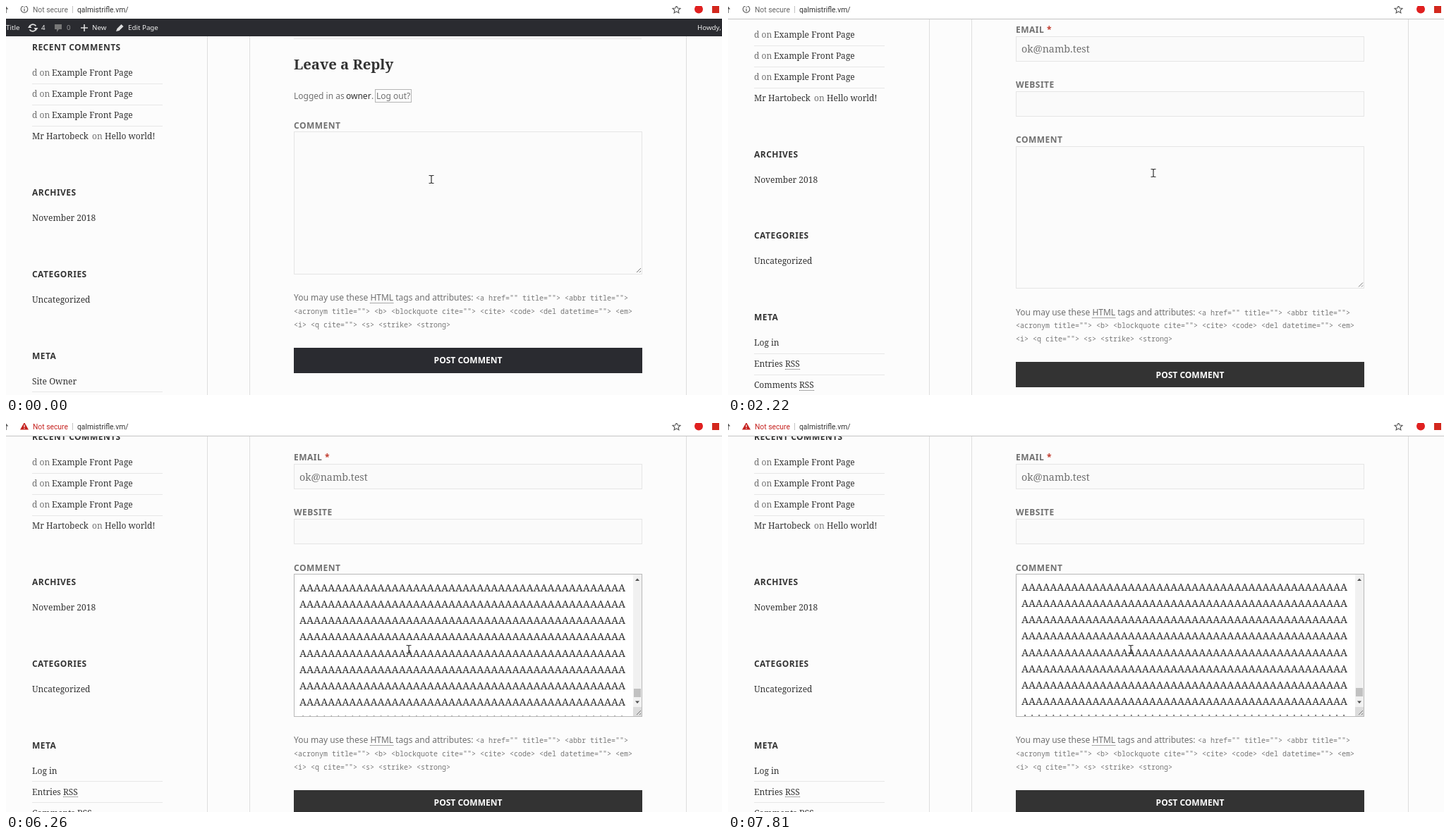
Recreate the animation shown at these times as an HTML page. Size 1015 by 552 pixels, loop 8000 ms.

```html
<!DOCTYPE html>
<html lang="en">
<head>
<meta charset="utf-8">
<title>Comment form</title>
<style>
  html, body { margin: 0; width: 100%; height: 100%; overflow: hidden; background: #fcfcfc; }
  svg { display: block; }
  text { font: 12px "Noto Sans", sans-serif; fill: #333; white-space: pre; }
  .serif { font-family: "Noto Serif", serif; }
  .soft { fill: #707070; }
  .body { font: 14.25px "Noto Serif", serif; }
  .head { font-weight: 700; letter-spacing: .04em; }
  .h1 { font: 700 29.25px "Noto Serif", serif; }
  .h2 { font: 700 20.25px "Noto Serif", serif; }
  .site { font-weight: 700; font-size: 20.25px; }
  .author { font-weight: 700; }
  .code { font: 10px "Noto Sans Mono", monospace; fill: #777; }
  .post { font-weight: 700; fill: #fff; text-anchor: middle; }
  .bar { font-size: 9.75px; fill: #eee; }
  .dim { opacity: .55; }
  .url { font: 10.3px Roboto, sans-serif; }
  rect, .rule { shape-rendering: crispEdges; }
  .rule { stroke: #e7e7e7; fill: none; }
  .chrome { stroke: #c4c4c4; }
  .edge { stroke: #dedede; fill: none; }
  .box { stroke: #e5e5e5; fill: #fafafa; }
  .dots { stroke: #555; stroke-dasharray: 1 1; shape-rendering: crispEdges; }
</style>
</head>
<body>
<svg id="stage" width="1015" height="552" viewBox="0 0 1015 552"></svg>
<script>
const LOOP = 8000, ROW = 23.25;

const text = (x, y, s, cls = '') =>
  `<text x="${x}" y="${y}" class="${cls}">${s.replace(/&/g, '&amp;').replace(/</g, '&lt;')}</text>`;
const line = (x1, x2, y, cls = 'rule') => `<path class="${cls}" d="M${x1} ${y}H${x2}"/>`;
const rect = (x, y, w, h, attrs) => `<rect x="${x}" y="${y}" width="${w}" height="${h}" ${attrs}/>`;
const group = (id, body) => `<g id="${id}">${body}</g>`;
const link = (y, s) => text(37, y, s, 'serif');
const label = (x, y, s, cls = '') => text(x, y, s, 'head ' + cls);
const sideRule = y => line(37, 222, y);

// Sidebar, laid out for an unscrolled page
function sidebar() {
  let s = text(37, 102.5, 'Example Title', 'site') +
    text(37, 126, 'Example Description', 'soft') +
    rect(37.5, 193.5, 185, 29, 'class="box"') + text(43.5, 212, 'Search …', 'soft') +
    label(37, 298, 'RECENT POSTS') + link(334, 'Hello world!') +
    label(37, 413, 'RECENT COMMENTS');
  for (let i = 0; i < 3; i++) {
    const y = 449 + i * 30;
    s += text(37, y, 'd on', 'serif soft') + text(65, y, 'Example Front Page', 'serif') + sideRule(y + 11.5);
  }
  s += link(539, 'Mr Hartobeck') + text(122, 539, 'on', 'serif soft') + text(140, 539, 'Hello world!', 'serif') +
    label(37, 619, 'ARCHIVES') + link(655, 'November 2018') +
    label(37, 734.5, 'CATEGORIES') + link(770.5, 'Uncategorized') +
    label(37, 850.5, 'META') + sideRule(897.5);
  const guest = link(886.5, 'Log in') + link(916.5, 'Entries RSS') + line(81, 102, 919.5, 'dots') +
    sideRule(927.5) + link(946.5, 'Comments RSS') + line(101, 122, 949.5, 'dots') +
    sideRule(957.5) + link(976.5, 'Site news');
  return s + group('guestMeta', guest) + group('userMeta', link(886.5, 'Site Owner'));
}

function comment(y) {
  return line(408, 901, y + .5) +
    `<g transform="translate(429 ${y + 48})"><circle r="21" fill="#c1c1c1"/>
     <ellipse cy="-3.5" rx="9.5" ry="10" fill="#fff"/>
     <path d="M-15 16Q-12 9-6 7H6Q12 9 15 16Q0 27-15 16Z" fill="#fff"/></g>` +
    text(474, y + 42, 'd', 'body author soft') +
    text(474, y + 65, 'November 13, 2018 at 10:42 pm', 'soft') +
    text(408, y + 107, 'dsd', 'body') +
    rect(408.5, y + 138.5, 58, 25, 'class="box"') + text(419, y + 155.5, 'REPLY', 'author soft');
}

function posts() {
  let s = rect(345.5, 81.5, 619, 221.5, 'class="edge"') + rect(345.5, 362.5, 619, 1480, 'class="edge"') +
    text(408, 173.5, 'Example Front Page', 'h1') +
    text(408, 233, 'Front Page created by QAlmistrifle', 'body') +
    text(408, 445, '3 thoughts on “Example Front Page”', 'h2');
  for (let i = 0; i < 3; i++) s += comment(478 + i * 193);
  return s;
}

// Guest fields, in the place where the page comes to rest
function fields() {
  const star = x => `<tspan x="${x}" fill="#c0392b">*</tspan>`;
  const field = (y, name, value, starX) =>
    `<text x="408" y="${y}" class="head soft">${name}${starX ? star(starX) : ''}</text>` +
    rect(408.5, y + 5.5, 493, 35, 'class="box"') + text(416, y + 28.5, value, 'body soft');
  return line(408, 901, -150.5) + text(408, -108, 'Leave a Reply', 'h2') +
    text(408, -67, 'Your email address will not be published. Required fields are marked *', 'soft') +
    field(-25, 'NAME', 'ok', 448) + field(53, 'EMAIL', 'ok@namb.test', 452) + field(131, 'WEBSITE', '');
}

function userIntro() {
  return line(408, 901, 46.5) + text(408, 90, 'Leave a Reply', 'h2') +
    text(408, 131.5, 'Logged in as', 'soft') + text(482, 131.5, 'owner') + text(518, 131.5, '.', 'soft') +
    rect(523.5, 118.5, 51, 18, 'fill="none" stroke="#b5b5b5" stroke-width="1.5"') +
    text(525, 131.5, 'Log out?', 'soft') +
    '<path class="edge" d="M345.5 43V552M964.5 43V552"/>';
}

function essay() {
  let s = text(416, 401, '></a>', 'body');
  for (let k = 1; k < 30; k++)
    s += text(416, 401 - k * ROW, 'A'.repeat(46) + (k === 1 ? "'" : ''), 'body');
  return s;
}

function commentBox() {
  const bar = rect(889, 215, 12, 188, 'id="rail"') + rect(889, 403, 12, 13, 'fill="#dcdcdc"') +
    rect(890, 378, 10, 12, 'id="thumb" fill="#c1c1c1"') +
    '<path d="M892 224l3-3.5 3 3.5z" fill="#505050"/><path id="down" d="M892 394.5l3 3.5 3-3.5z"/>';
  return label(408, 209.5, 'COMMENT', 'soft') +
    rect(408.5, 214.5, 493, 201.5, 'id="area"') +
    group('pasted', `<g clip-path="url(#inner)">${group('essay', essay())}</g>` + bar) +
    '<path d="M894 414l6-6M898 414l2-2" stroke="#777"/>' +
    rect(416, 224, 1, 20, 'id="caret" fill="#222"') +
    text(408, 454, 'You may use these HTML tags and attributes:', 'soft') + line(516, 549, 457.5, 'dots') +
    text(666, 454, '<a href="" title=""> <abbr title="">', 'code') +
    text(408, 472.5, '<acronym title=""> <b> <blockquote cite=""> <cite> <code> <del datetime=""> <em>', 'code') +
    text(408, 491.5, '<i> <q cite=""> <s> <strike> <strong>', 'code') +
    rect(408, 520.5, 494, 36, 'id="button"') + text(655, 543, 'POST COMMENT', 'post');
}

function toolbar() {
  return rect(0, 18, 1015, 25, 'fill="#2a2b30"') +
    text(0, 34, 'Title', 'bar') + text(50, 34, '4', 'bar') + text(86, 34, '0', 'bar dim') +
    text(122, 34, 'New', 'bar') + text(173, 34, 'Edit Page', 'bar') + text(980, 34, 'Howdy,', 'bar') +
    `<path d="M33.5 29.5A5 5 0 0 1 42.5 28.5M42.5 32.5A5 5 0 0 1 33.5 33.5M111 26V36M106 31H116" fill="none" stroke="#ddd" stroke-width="1.6"/>
     <path d="M31 31l2.5-4 3 4zM39.5 31h6l-3 4z" fill="#ddd"/>
     <path d="M69 26h10v7h-4l-3 4v-4h-3z" fill="#777"/>
     <path d="M156 36l1.5-4 6-6 3 3-6 6z" fill="#ddd"/>`;
}

function browserBar() {
  return rect(0, 0, 1015, 18, 'fill="#fff"') + line(0, 1015, 18.5, 'rule chrome') +
    '<path d="M0 1V10M0 2l2.5 2.5" stroke="#555" stroke-width="1.5" fill="none"/>' +
    group('info', '<circle cx="26" cy="4.5" r="4.8" fill="none" stroke="#666" stroke-width="1.2"/><path d="M26 4V7.5M26 1.7V3" stroke="#666" stroke-width="1.3"/>') +
    group('warn', '<path d="M26-1L32 9.5H20Z" fill="#c5221f"/><path d="M26 2.5V6M26 7V8.3" stroke="#fff" stroke-width="1.2"/>') +
    text(38, 8.5, 'Not secure', 'url" id="secure') +
    '<path class="rule chrome" d="M94.5 0V10"/>' + text(101, 8.5, 'qalmistrifle.vm/', 'url') +
    '<path d="M950.5-.5l1.6 3.5 3.9.4-2.9 2.6.8 3.8-3.4-2-3.4 2 .8-3.8-2.9-2.6 3.9-.4z" fill="none" stroke="#555" stroke-width="1.1"/>' +
    '<circle cx="982" cy="4.5" r="6" fill="#e02020"/>' + rect(1001, 0, 10, 10, 'fill="#d3281e"');
}

const cursors =
  group('beam', '<path d="M-3.5-5.5H-1L0-4.5 1-5.5H3.5M0-4.5V4.5M-3.5 5.5H-1L0 4.5 1 5.5H3.5" fill="none" stroke="#333" stroke-width="1.2"/>') +
  group('arrow', '<path d="M0 0V12.5L3 9.8 5 14.3 7 13.4 5 9.2H8.5Z" fill="#fff" stroke="#222"/>');

document.getElementById('stage').innerHTML =
  '<defs><clipPath id="inner"><rect x="409" y="215" width="480" height="200.5"/></clipPath></defs>' +
  rect(0, 0, 1015, 552, 'fill="#fcfcfc"') +
  '<path class="edge" d="M285.5 19V552"/>' +
  group('side', sidebar()) + group('posts', posts()) + group('intro', userIntro()) +
  group('form', group('fields', fields()) + commentBox()) +
  browserBar() + group('toolbar', toolbar()) + group('cursor', cursors);

const $ = id => document.getElementById(id);
const show = (id, on) => $(id).style.display = on ? '' : 'none';
const move = (id, x, y) => $(id).setAttribute('transform', `translate(${x} ${y})`);
const paint = (id, fill) => $(id).style.fill = fill;
// Holds each value until the next time in the list
const at = (steps, t) => steps.reduce((v, s) => s[0] <= t ? s : v);

const LOGOUT = 280, FOCUS = 2920, PASTE = 4890, REST = 1208;
const pageScroll = [[0, 0], [720, 20], [870, 69], [1010, 210], [1140, 400], [1270, 620], [1400, 850],
  [1540, 1080], [1670, 1270], [1830, 1308], [1960, 1300], [2090, 1258], [2220, 1223.5], [2350, REST]];
const areaScroll = [[0, 0], [5960, 55], [6100, 100], [6230, 70], [6400, 20], [6540, 0], [6810, 23.5],
  [6970, 75], [7140, 124], [7310, 180], [7480, 235], [7640, 280], [7810, 301.5]];
const pointer = [[0, 603, 246], [LOGOUT, 602, 242], [1540, 603, 242], [2090, 603, 237], [2490, 585, 240],
  [2620, 540, 250], [2760, 510, 256], [5290, 520, 268], [5430, 550, 302], [5560, 571, 321]];

function draw(now) {
  const t = now % LOOP, user = t < LOGOUT, pasted = t >= PASTE, focus = t >= FOCUS;
  const y = at(pageScroll, t)[1], o = at(areaScroll, t)[1];
  for (const id of ['intro', 'toolbar', 'userMeta']) show(id, user);
  for (const id of ['posts', 'fields', 'guestMeta']) show(id, !user);

  // The sidebar stops at its end and follows again on the way back
  const sideY = t < 1830 ? Math.min(y, 489) : y - 819;
  move('side', 0, user ? -350 : -sideY);
  move('posts', 0, -y);
  move('form', 0, user ? -36 : REST - y);
  paint('button', user ? '#2a2b30' : '#333');

  paint('area', focus ? '#fff' : '#fbfbfb');
  $('area').style.stroke = focus ? '#b9b9b9' : '#e5e5e5';
  show('pasted', pasted);
  move('essay', 0, o);
  move('thumb', 0, -Math.ceil(o / 200));
  paint('rail', t < 5960 ? '#fdfdfd' : '#f1f1f1');
  paint('down', o ? '#505050' : '#b0b0b0');
  show('caret', focus && t < 3490 || t >= 4050 && t < 5290);
  move('caret', pasted ? 36 : 0, pasted ? 162 : 0);

  show('info', !pasted);
  show('warn', pasted);
  paint('secure', pasted ? '#c5221f' : '#666');

  const [, px, py] = at(pointer, t), arrow = t >= LOGOUT && t < 1540;
  move('cursor', px, py);
  show('arrow', arrow);
  show('beam', !arrow);
}

const start = performance.now();
(function tick() {
  draw(performance.now() - start);
  requestAnimationFrame(tick);
})();
</script>
</body>
</html>
```
